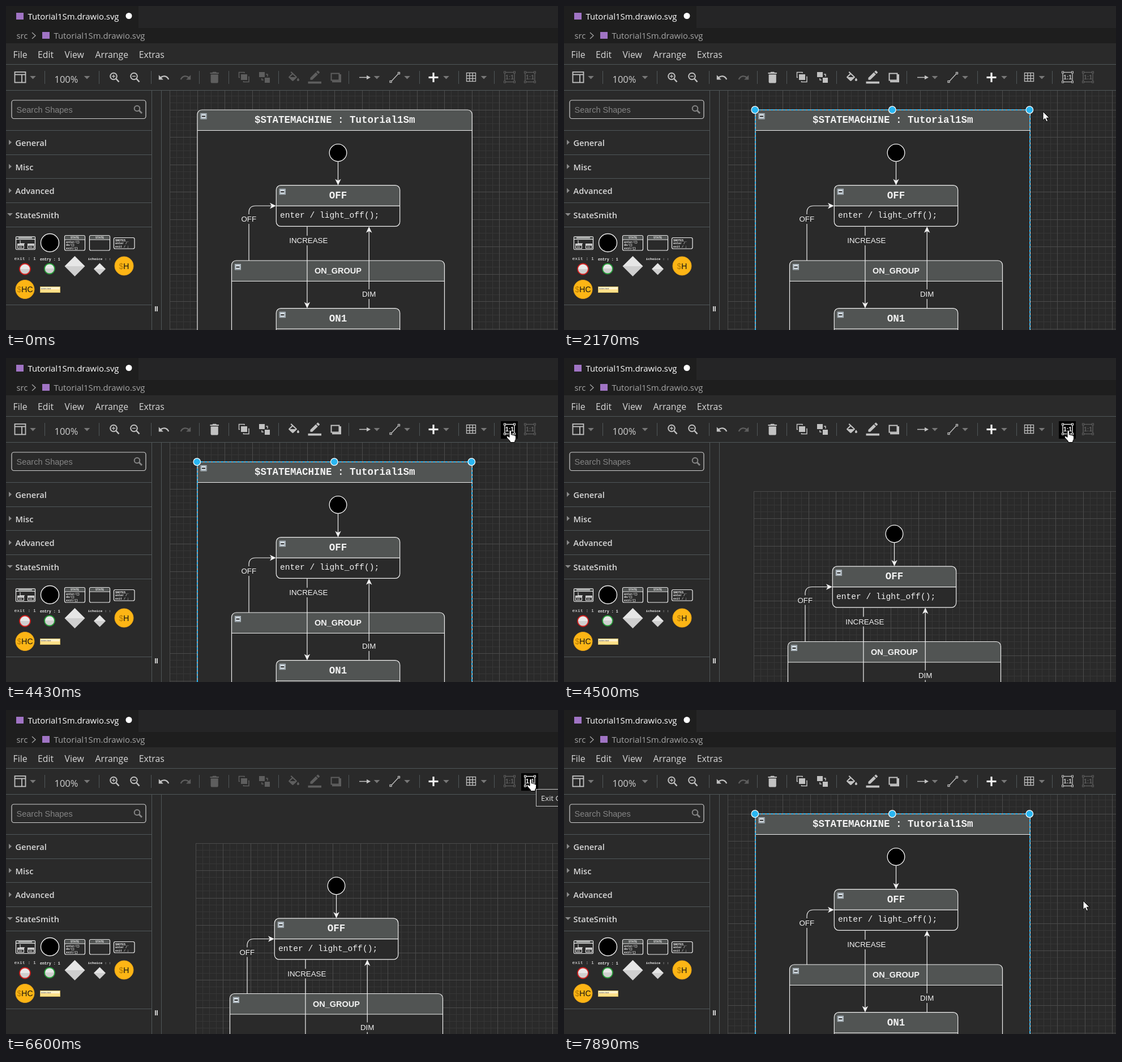
An HTML page with a canvas for the animation above (8000 ms loop, 975 px wide and 574 px high).

```html
<!DOCTYPE html>
<html lang="en">
<head>
<meta charset="utf-8">
<title>State machine editor</title>
<style>
html, body { margin: 0; width: 100%; height: 100%; overflow: hidden; background: #2a2a2a; }
canvas { display: block; width: 975px; height: 574px; }
</style>
</head>
<body>
<canvas id="stage" width="975" height="574"></canvas>
<script>
const g = document.getElementById('stage').getContext('2d');
const LOOP = 8000, W = 975, H = 574;
const UI = '"Open Sans", "Noto Sans", sans-serif';
const ARIAL = '"Liberation Sans", sans-serif';
const MONO = '"Liberation Mono", monospace';
const BG = '#2a2a2a', RULE = '#505759', HEAD = '#515453', INK = '#f2f2f2';
const LIT = '#c2c2c2', DIM = '#5e5e5e', BLUE = '#29b6f2';
const GRID = 12.125;

// --- drawing helpers ---
function fill(x, y, w, h, c) { g.fillStyle = c; g.fillRect(x, y, w, h); }
function box(x, y, w, h, c, lw = 1) { g.strokeStyle = c; g.lineWidth = lw; g.strokeRect(x, y, w, h); }
function line(c, lw, ...p) {
  g.strokeStyle = c; g.lineWidth = lw; g.beginPath();
  for (let i = 0; i < p.length; i += 2) g.lineTo(p[i], p[i + 1]);
  g.stroke();
}
function poly(c, ...p) {
  g.fillStyle = c; g.beginPath();
  for (let i = 0; i < p.length; i += 2) g.lineTo(p[i], p[i + 1]);
  g.fill();
}
function circle(x, y, r, c, edge, lw = 1.3) {
  g.beginPath(); g.arc(x, y, r, 0, 7);
  if (c) { g.fillStyle = c; g.fill(); }
  if (edge) { g.strokeStyle = edge; g.lineWidth = lw; g.stroke(); }
}
function text(s, x, y, font, c, align = 'left') {
  g.font = font; g.fillStyle = c; g.textAlign = align; g.fillText(s, x, y);
}
function glyph(d, x, y, sx, sy, c, edge) {
  g.save(); g.translate(x, y); g.scale(sx, sy);
  const p = new Path2D(d);
  g.fillStyle = c; g.fill(p);
  if (edge) { g.strokeStyle = edge; g.lineWidth = 1; g.stroke(p); }
  g.restore();
}
function round(x, y, w, h, r, c, edge, lw = 1.2) {
  g.beginPath(); g.roundRect(x, y, w, h, r);
  if (c) { g.fillStyle = c; g.fill(); }
  if (edge) { g.strokeStyle = edge; g.lineWidth = lw; g.stroke(); }
}

const UNDO = 'M12.5 8c-2.65 0-5.05.99-6.9 2.6L2 7v9h9l-3.62-3.62c1.39-1.16 3.16-1.88 5.12-1.88 3.54 0 6.55 2.31 7.6 5.5l2.37-.78C21.08 11.03 17.15 8 12.5 8z';
const TRASH = 'M6 19c0 1.1.9 2 2 2h8c1.1 0 2-.9 2-2V7H6v12zM19 4h-3.5l-1-1h-5l-1 1H5v2h14V4z';
const BUCKET = 'M16.56 8.94L7.62 0 6.21 1.41l2.38 2.38-5.15 5.15c-.59.59-.59 1.54 0 2.12l5.5 5.5c.6.6 1.5.6 2.12 0l5.5-5.5c.59-.58.59-1.53 0-2.12zM5.21 10L10 5.21 14.79 10zM19 11.5s-2 2.17-2 3.5c0 1.1.9 2 2 2s2-.9 2-2c0-1.33-2-3.5-2-3.5z';
const PEN = 'M17.75 7L14 3.25l-10 10V17h3.75zm2.96-2.96c.39-.39.39-1.02 0-1.41L18.37.29c-.39-.39-1.02-.39-1.41 0L15 2.25 18.75 6zM0 20h24v4H0z';
const ARROW = 'M0 0V15.5L3.6 12.2 6 17.8 8.6 16.7 6.3 11.2H11.2Z';
const HAND = 'M5 2Q5 0 6.7 0 8.4 0 8.4 2V8Q10 7 11.4 8.6 13 7.8 14 9.4 16.5 9 16.5 11.5V15Q16.5 17 14.8 19V21.5H6.5V19.5L1 13.5Q-.5 11 1.2 10.5 2.8 10 5 12.5Z';
const MOVE = 'M0-10L3.6-6H1V-1H6V-3.6L10 0 6 3.6V1H1V6H3.6L0 10-3.6 6H-1V1H-6V3.6L-10 0-6-3.6V-1H-1V-6H-3.6Z';

// --- window chrome ---
function titleBars() {
  fill(0, 0, W, 39, '#252526');
  fill(0, 0, 234, 39, '#1e1e1e');
  fill(0, 39, W, 27, '#1e1e1e');
  fill(18, 12, 13, 12, '#a074c4');
  fill(64, 46, 13, 12, '#a074c4');
  text('Tutorial1Sm.drawio.svg', 38.5, 24, '14.85px ' + UI, '#fff');
  circle(217, 17.5, 5.5, '#fff');
  text('src', 18.5, 58, '14.85px ' + UI, '#a5a5a5');
  line('#a5a5a5', 1.3, 46, 47, 52, 52.5, 46, 58);
  text('Tutorial1Sm.drawio.svg', 84.5, 58, '14.85px ' + UI, '#a5a5a5');
}

function menuBar() {
  fill(0, 66, W, 84, BG);
  [['File', 12.5], ['Edit', 56], ['View', 103.5], ['Arrange', 157.5], ['Extras', 234.7]]
    .forEach(([s, x]) => text(s, x, 92, '15.8px ' + UI, '#d8d8d8'));
  fill(0, 103, W, 1, RULE);
  fill(0, 149, W, 1, RULE);
}

function zoom(x, plus) {
  circle(x, 124.5, 5.8, null, LIT, 2);
  line(LIT, 2.6, x + 4.5, 129, x + 9.5, 134.5);
  line(LIT, 1.4, x - 3, 124.5, x + 3, 124.5);
  if (plus) line(LIT, 1.4, x, 121.5, x, 127.5);
}

function groupIcon(x, on, hover) {
  if (hover) fill(x - 15.5, 112, 30, 31, '#000');
  const c = hover ? '#fff' : on ? LIT : DIM;
  box(x - 8.5, 117.5, 17, 17, c, 1.3);
  for (const dx of [-10.5, 6.5]) for (const y of [115.5, 132.5]) {
    fill(x + dx, y, 4, 4, hover ? '#000' : BG);
    box(x + dx + .5, y + .5, 3, 3, c);
  }
  text('1:1', x, 129.5, 'bold 10.5px ' + ARIAL, c, 'center');
}

function toolbar(s) {
  for (const x of [68, 164, 256, 341, 393, 481, 605, 730, 799, 862]) fill(x, 115, 1, 23, RULE);
  for (const x of [47.5, 143, 655, 708.5, 777.5, 844]) poly('#777', x - 5.3, 124, x + 5.3, 124, x, 129.5);
  box(15.5, 117, 19, 18.5, LIT, 1.8);
  line(LIT, 1.8, 15, 121.5, 35, 121.5);
  line(LIT, 1.8, 28, 121, 28, 135);
  text('100%', 85.5, 135.5, '16.5px ' + UI, '#d0d0d0');
  zoom(190, true);
  zoom(226, false);
  glyph(UNDO, 268, 116, .9, .9, LIT);
  glyph(UNDO, 328, 116, -.9, .9, DIM);

  const c = s.tools ? LIT : DIM;
  glyph(TRASH, 355, 113.5, 1.1, 1.1, c);
  fill(415, 121, 11, 10, c);
  line(c, 1.5, 413, 126.5, 411.5, 126.5, 411.5, 117.5, 421, 117.5, 421, 119);
  line(c, 1.5, 428, 125.5, 429, 125.5, 429, 134.5, 419.5, 134.5, 419.5, 133);
  fill(447, 117, 10, 9, c);
  fill(457, 127, 9, 9, c);
  line(c, 1.5, 459, 121, 462, 121, 462, 125);
  line(c, 1.5, 452, 128, 452, 131, 455, 131);
  glyph(BUCKET, 496, 116, 1.05, 1, c);
  glyph(PEN, 533.5, 114.5, .98, .96, c);
  box(574.5, 119.5, 14, 12, c, 2);
  line(c, 3, 576, 133.8, 590.5, 133.8, 590.5, 121);

  line(LIT, 1.5, 624, 126.5, 638, 126.5);
  poly(LIT, 637, 122.8, 644, 126.5, 637, 130.2);
  line(LIT, 1.3, 681, 133, 693, 120);
  box(678, 132.5, 3, 3, LIT, 1.2);
  box(692.5, 117.5, 3, 3, LIT, 1.2);
  line('#f4f4f4', 3.2, 746.5, 126.5, 763.5, 126.5);
  line('#f4f4f4', 3.2, 755, 118, 755, 135);
  box(813.5, 118.5, 16, 15, LIT, 1.3);
  for (const k of [1, 2]) {
    line(LIT, 1.3, 813.5 + 5.33 * k, 118, 813.5 + 5.33 * k, 134);
    line(LIT, 1.3, 813, 118.5 + 5 * k, 830, 118.5 + 5 * k);
  }
  groupIcon(889.5, s.enterOn, s.hover === 1);
  groupIcon(925.5, s.exitOn, s.hover === 2);
}

// --- shape palette ---
function miniState(x, y, w, h, title, rows) {
  round(x, y, w, h, 2.5, BG, INK, 1.2);
  if (title) {
    fill(x + 1, y + 1, w - 2, 6, HEAD);
    line(INK, 1, x, y + 7.5, x + w, y + 7.5);
    text(title, x + w / 2, y + 5.8, 'bold 5px ' + MONO, INK, 'center');
  }
  rows.forEach((r, i) => text(r, x + 2.5, y + (title ? 13 : 6) + i * 5.5, 'bold 5px ' + MONO, INK));
}

function fade(y, h, a, b) {
  const f = g.createLinearGradient(0, y - h, 0, y + h);
  f.addColorStop(0, a); f.addColorStop(.5, a); f.addColorStop(.5, b); f.addColorStop(1, b);
  return f;
}

function diamond(x, y, r) {
  poly(fade(y, r, '#e6e6e6', '#cfcfcf'), x, y - r, x + r, y, x, y + r, x - r, y);
}

function history(x, y, s) {
  circle(x, y, 16.5, '#fdb515', '#e9a21a', 1);
  g.font = '14px ' + ARIAL;
  const w = g.measureText('$' + s).width;
  text('$', x - w / 2, y + 5, g.font, '#b47a00');
  text(s, x + w / 2, y + 5, g.font, '#111', 'right');
}

function sidebar() {
  fill(0, 150, 275, 424, BG);
  fill(257, 150, 1, 424, RULE);
  fill(274, 150, 1, 424, RULE);
  fill(263, 532, 2, 9, '#ccc');
  fill(266, 532, 2, 9, '#ccc');
  round(10, 167, 237, 32.5, 4, null, '#d0d0d0', 1.2);
  text('Search Shapes', 18.5, 189, '14.5px ' + ARIAL, '#858585');
  circle(231.5, 181.5, 4.8, null, '#858585', 2);
  line('#858585', 2.8, 235, 185, 240, 190);
  for (const y of [220, 263, 305, 348, 391, 529]) fill(0, y, 257, 1, RULE);
  ['General', 'Misc', 'Advanced', 'StateSmith'].forEach((s, i) => {
    const y = 248 + i * 42.7;
    text(s, 16.5, y, '600 14.6px ' + UI, '#d8d8d8');
    if (i < 3) poly('#8a8a8a', 5, y - 11, 10, y - 6.5, 5, y - 2);
    else poly('#8a8a8a', 2, y - 9, 12, y - 9, 7, y - 4);
  });

  round(17.5, 408.5, 34, 23, 1.5, BG, INK, 1.2);
  fill(18, 409, 33, 4, HEAD);
  line(INK, 1, 17.5, 413.5, 51.5, 413.5);
  fill(22, 410, 24, 1.5, INK);
  line(INK, 1, 25, 415, 25, 421, 33, 421);
  for (const x of [20.5, 38.5]) {
    box(x, 421.5, 11, 8, INK);
    fill(x, 422, 11, 3, '#bbb');
    fill(x + 2, 426.5, 6, 1, INK);
  }
  circle(77.5, 419.5, 16, '#000', INK, 1.4);
  miniState(103.5, 406.5, 36, 26.5, 'STATE', ['enter/{}', 'do/{}', 'exit/{}']);
  miniState(147.5, 406.5, 36, 26.5, 'STATE', []);
  miniState(190.5, 410.5, 36.5, 19.5, '', ['$NOTES__', 'enter / ', 'exit / ;']);
  text('exit : 1', 14.5, 450, '8px ' + MONO, INK);
  text('entry : 1', 60, 451, 'bold 6.6px ' + MONO, INK);
  text('ichoice : :', 144.5, 450, 'bold 6.2px ' + MONO, INK);
  circle(33.5, 466, 9.5, fade(466, 9, '#e8e8e8', '#cfcfcf'), '#d3201f', 1.8);
  circle(77, 465.5, 9, fade(465.5, 9, '#e8e8e8', '#cfcfcf'), '#28a03a', 1.8);
  diamond(121.5, 461, 18);
  diamond(165.5, 466, 10.5);
  history(208.5, 460.5, 'H');
  history(33.5, 502, 'HC');
  fill(60.5, 497, 35, 11, '#fff2cc');
  fill(60.5, 502, 35, 6, '#ffe08a');
  box(60.5, 497.5, 35, 10, '#d6b656', .8);
  text('notes text', 62, 501.5, '4px ' + ARIAL, '#333');
}

// --- diagram ---
function grid(left, top) {
  for (const major of [false, true]) {
    const c = major ? '#4b4b4b' : '#363636';
    for (let k = 0; left + k * GRID < W; k++)
      if ((k % 4 === 0) === major) fill(Math.floor(left + k * GRID), top, 1, H, c);
    for (let k = 0; top + k * GRID < H; k++)
      if ((k % 4 === 0) === major) fill(left, Math.floor(top + k * GRID), W, 1, c);
  }
}

function state(x, y, w, h, title, font) {
  round(x, y, w, h, 8, BG);
  g.save();
  g.beginPath(); g.roundRect(x, y, w, h, 8); g.clip();
  fill(x, y, w, 36.5, HEAD);
  g.restore();
  line(INK, 1.2, x, y + 36.5, x + w, y + 36.5);
  round(x, y, w, h, 8, null, INK);
  text(title, x + w / 2, y + 23.2, font, INK, 'center');
  fill(x + 5.5, y + 6, 11, 10.5, '#d5dde3');
  box(x + 6.5, y + 7, 9, 8.5, '#87939c');
  fill(x + 8, y + 10.5, 6, 2, '#222');
}

function head(x, y, dx, dy) {
  const p = (a, b) => [x - dx * a - dy * b, y - dy * a + dx * b];
  poly(INK, ...p(0, 0), ...p(11, 5.2), ...p(8, 0), ...p(11, -5.2));
}

function label(s, x, y) {
  const font = '13.34px ' + ARIAL;
  g.font = font;
  const w = g.measureText(s).width;
  fill(x - w / 2, y - 13, w, 17, BG);
  text(s, x, y, font, INK, 'center');
}

function machine(whole) {
  const title = 'bold 17.5px ' + MONO;
  if (whole) state(338, 184, 485.3, 800, '$STATEMACHINE : Tutorial1Sm', title);
  circle(586.5, 260, 15.3, '#000', INK, 1.3);
  state(477.3, 317.7, 218.4, 72.6, 'OFF', title);
  text('enter / light_off();', 484, 375, '14.6px ' + MONO, INK);
  state(398.5, 451, 376, 500, 'ON_GROUP', 'bold 14.5px ' + ARIAL);
  state(477.3, 535.7, 218.4, 300, 'ON1', title);

  line(INK, 1.2, 586.5, 275.5, 586.5, 310);
  head(586.5, 317.5, 0, 1);
  g.beginPath(); g.moveTo(429, 451); g.lineTo(429, 366);
  g.quadraticCurveTo(429, 354, 441, 354); g.lineTo(469, 354); g.stroke();
  head(477, 354, 1, 0);
  line(INK, 1.2, 531.9, 390.5, 531.9, 528);
  head(531.9, 535.5, 0, 1);
  line(INK, 1.2, 641.2, 535.5, 641.2, 398);
  head(641.2, 390.7, 0, -1);
  label('OFF', 428.7, 382);
  label('INCREASE', 534.3, 420);
  label('DIM', 641.2, 515);
}

function selection() {
  g.setLineDash([3.6, 3.6]);
  line(BLUE, 2, 338, H, 338, 184, 823, 184, 823, H);
  g.setLineDash([]);
  for (const x of [337.3, 579.8, 822.3]) circle(x, 184, 6.3, BLUE, '#fff', 1.2);
}

function anchors() {
  for (let k = 0; k < 5; k++) {
    const x = 338 + k * 121.3;
    line(BLUE, 1, x - 2.5, 181.5, x + 2.5, 186.5);
    line(BLUE, 1, x + 2.5, 181.5, x - 2.5, 186.5);
  }
}

function canvasArea(s) {
  g.save();
  g.beginPath(); g.rect(275, 150, W, H); g.clip();
  fill(275, 150, W, H, BG);
  if (s.inside) {
    grid(335, 236);
    g.translate(-3, 51.5);
    machine(false);
  } else {
    grid(289.5, 135.5);
    if (s.hint) { fill(575, 150, 9, 15, '#2b4757'); box(576, 150, 7, 14, '#2d5a73'); }
    machine(true);
    if (s.anchors) anchors();
    if (s.selected) selection();
  }
  g.restore();
}

// --- timeline ---
const easeOut = p => 1 - (1 - p) ** 2;
const smooth = p => p * p * (3 - 2 * p);
// start, end, steps, from, to, easing
const moves = [
  [330, 750, 7, [930, 572], [773, 282], easeOut],
  [1750, 2510, 12, [773, 282], [890, 129], smooth],
  [4570, 5050, 8, [890, 129], [897, 338], smooth],
  [5380, 6070, 11, [897, 338], [926, 123], smooth],
  [7680, 7890, 4, [926, 123], [917, 338], smooth]
];

function pointer(t) {
  const m = moves.filter(v => t >= v[0]).pop();
  if (!m) return null;
  const [t0, t1, n, a, b, ease] = m;
  const k = Math.min(n, Math.floor((t - t0) / (t1 - t0) * (n - 1) + 1e-6) + 1);
  const p = ease(k / n);
  return [a[0] + (b[0] - a[0]) * p, a[1] + (b[1] - a[1]) * p];
}

const between = (t, a, b) => t >= a && t < b;

function stateAt(t) {
  const at = pointer(t);
  const over = (x0, x1) => !!at && at[1] < 143 && at[0] >= x0 && at[0] < x1;
  const inside = between(t, 4500, 7280);
  const onMachine = !!at && !inside && at[0] < 823 && at[1] > 184;
  const enterOn = between(t, 1550, 4570) || t >= 7480;
  const exitOn = between(t, 4570, 7480);
  const hover = enterOn && over(874, 904) ? 1 : exitOn && over(910, 940) ? 2 : 0;
  const hand = between(t, 2580, 4570) || (t >= 6000 && over(910, 940));
  return {
    at, inside, enterOn, exitOn, hover,
    tools: enterOn,
    selected: between(t, 1410, 4500) || t >= 7280,
    anchors: onMachine && t < 1410,
    hint: t >= 1210 && t < 4000 && onMachine,
    shape: hand ? 'hand' : onMachine ? 'move' : 'arrow',
    tip: between(t, 3130, 4300) ? ['Enter Group', 900.5, 145.5]
       : between(t, 6600, 7150) ? ['Exit Group', 936.5, 140.5] : null
  };
}

function cursor(s) {
  if (!s.at) return;
  const [x, y] = s.at.map(Math.round);
  if (s.shape === 'hand') glyph(HAND, x - 6, y - 1, 1, 1, '#fff', '#000');
  else if (s.shape === 'move') glyph(MOVE, x, y, 1, 1, '#fff', '#000');
  else glyph(ARROW, x, y, 1, 1, '#fff', '#000');
}

function frame(now) {
  const s = stateAt(now % LOOP);
  canvasArea(s);
  titleBars();
  menuBar();
  toolbar(s);
  sidebar();
  if (s.tip) {
    const [label, x, y] = s.tip;
    fill(x, y, 120, 30, BG);
    box(x, y, 120, 30, '#c8c8c8');
    text(label, x + 8.5, y + 20, '13.1px ' + UI, '#e4e4e4');
  }
  cursor(s);
}

const start = performance.now();
function tick() {
  frame(performance.now() - start);
  requestAnimationFrame(tick);
}
tick();
</script>
</body>
</html>
```
